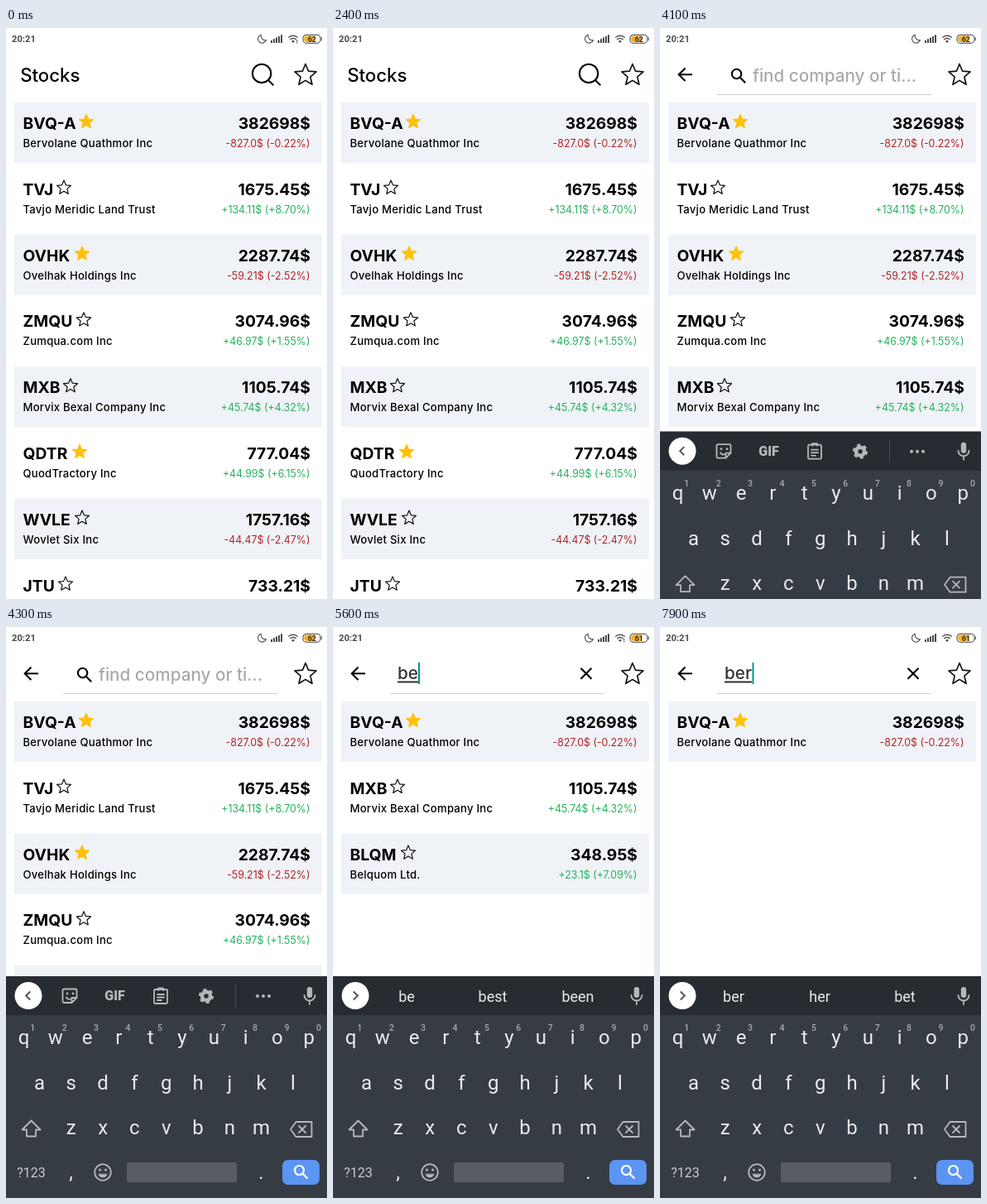
These frames come from a looping animation (388 px wide and 690 px high, 8000 ms). An HTML page:

```html
<!DOCTYPE html>
<html lang="en">
<head>
<meta charset="utf-8">
<title>Stocks search</title>
<style>
  html, body { margin: 0; width: 100%; height: 100%; overflow: hidden; background: #fff; }
  svg { display: block; width: 100%; height: 100%; }
  text { font-family: Inter, "Open Sans", sans-serif; }
  .line { fill: none; stroke: #000; stroke-width: 2.1; }
  .ticker { font-size: 19.3px; font-weight: 700; }
  .name { font-size: 13.1px; font-weight: 500; letter-spacing: .25px; }
  .change { font-size: 12.4px; }
  .end { text-anchor: end; }
  .title { font-size: 22.2px; font-weight: 500; }
  .field { font-size: 20.7px; font-weight: 500; }
  .typed { fill: #333; text-decoration: underline; text-decoration-thickness: 1.5px; text-underline-offset: 3px; }
  .up { fill: #24b25d; }
  .down { fill: #b22424; }
  .star { fill: none; stroke: #111; stroke-width: 1.2; stroke-linejoin: round; }
  .star.fav { fill: #ffc107; stroke: #ffc107; }
  .status text, .board text { font-family: Roboto, "Noto Sans", sans-serif; }
  .board text { fill: #e8eaed; text-anchor: middle; }
  .key { font-size: 24px; }
  .board .hint { font-size: 10.5px; font-weight: 500; fill: #a4a9af; }
  .word { font-size: 18px; }
  .icon { fill: none; stroke: #b4b8bd; stroke-width: 1.8; stroke-linejoin: round; stroke-linecap: round; }
  .solid { fill: #b4b8bd; stroke: none; }
</style>
</head>
<body>
<svg viewBox="0 0 388 690" preserveAspectRatio="none">
  <rect width="388" height="690" fill="#fff"/>
  <g id="lists"></g>

  <g class="status" fill="#4a4a4a">
    <text x="7" y="17" font-size="11.2" font-weight="700">20:21</text>
    <path d="M308.2 8.2a5.1 5.1 0 1 0 6.2 6.6a5.6 5.6 0 0 1-6.2-6.6z" fill="none" stroke="#4a4a4a" stroke-width="1.1"/>
    <path d="M320 15h2v3h-2zM323 13.3h2v4.7h-2zM326 11.6h2v6.4h-2zM329 10h2v8h-2zM332 8.3h2v9.7h-2z"/>
    <path d="M341.2 11.6a8.3 8.3 0 0 1 11.6 0M343.2 14a5.5 5.5 0 0 1 7.6 0" fill="none" stroke="#4a4a4a" stroke-width="1.3"/>
    <path d="M345 15.9a2.8 2.8 0 0 1 4 0l-2 2.1z"/>
    <path data-on="0-500 5300-6300" d="M350.2 16l1.5-2.2l1.5 2.2zM350.2 16.8h3l-1.5 2.2z" stroke="#fff" stroke-width=".4"/>
    <rect x="359" y="8.3" width="21" height="10" rx="4" fill="#fff" stroke="#666" stroke-width="1.2"/>
    <path d="M364 9.5h9.5v7.6h-9.5a3.8 3.8 0 0 1 0-7.6z" fill="#ffae1a"/>
    <path d="M381.2 11.3v4" stroke="#666" stroke-width="1.4"/>
    <text id="battery" x="369.8" y="16.5" font-size="9" font-weight="700" text-anchor="middle" fill="#333"></text>
  </g>

  <g data-on="0-3500">
    <text class="title" x="17.2" y="64.8">Stocks</text>
    <circle class="line" cx="309.1" cy="54.9" r="11.2"/>
    <path class="line" d="M317 63l6.3 6.3"/>
  </g>
  <g data-on="3500-8000">
    <path class="line" d="M39 56.2H23M30.5 48.4l-7.8 7.8l7.8 7.8"/>
    <path d="M69 80.5H328" stroke="#cfcfcf"/>
  </g>
  <g data-on="3500-4700">
    <circle class="line" cx="92.6" cy="55.5" r="5.7"/>
    <path class="line" d="M96.8 59.8l6.4 6.4"/>
    <text class="field" x="112" y="64.8" fill="#a9a9a9">find company or ti...</text>
  </g>
  <g data-on="4700-8000">
    <text class="field typed" id="typed" x="78" y="63.4"></text>
    <rect id="caret" y="43" width="2" height="26" fill="#009688"/>
    <path class="line" d="M299.5 49.7l13 13M312.5 49.7l-13 13"/>
  </g>
  <path id="bigStar" class="star" style="stroke-width:1.7"/>

  <g id="board" class="board">
    <rect y="422" width="388" height="268" fill="#363c44"/>
    <rect y="422" width="388" height="47" fill="#272c32"/>
    <circle cx="27" cy="445.5" r="16.5" fill="#fff"/>
    <path data-on="4000-4700" d="M29.2 440.5l-5 5l5 5" fill="none" stroke="#555" stroke-width="2"/>
    <path data-on="4700-8000" d="M24.8 440.5l5 5l-5 5" fill="none" stroke="#555" stroke-width="2"/>

    <g class="icon" data-on="4000-4700">
      <path d="M70 437.5h14q1.5 0 1.5 1.5v9l-6 6H70q-1.5 0-1.5-1.5V439q0-1.5 1.5-1.5zM85.5 448h-6v6M73 447.5a4 4 0 0 0 5 2"/>
      <circle class="solid" cx="74" cy="443" r="1.4"/>
      <circle class="solid" cx="81" cy="443" r="1.4"/>
      <text x="131.5" y="451" font-size="16" font-weight="900" style="fill:#b4b8bd;stroke:none">GIF</text>
      <rect x="179" y="438" width="16" height="17" rx="1.5"/>
      <path d="M184 439v-2.5h6v2.5M183 444h8M183 447.5h8M183 451h5"/>
      <circle cx="242" cy="446" r="5" stroke-width="4.5"/>
      <circle cx="242" cy="446" r="7.6" stroke-width="3" stroke-linecap="butt" stroke-dasharray="3.98"/>
      <path d="M277.5 432v28" stroke="#464c53" stroke-width="1"/>
      <circle class="solid" cx="304" cy="446" r="2"/>
      <circle class="solid" cx="311" cy="446" r="2"/>
      <circle class="solid" cx="318" cy="446" r="2"/>
    </g>
    <g id="words" data-on="4700-8000">
      <text class="word" x="89" y="453"></text>
      <text class="word" x="193" y="453"></text>
      <text class="word" x="296" y="453"></text>
    </g>
    <g class="icon">
      <rect class="solid" x="363.8" y="435" width="6.4" height="13" rx="3.2"/>
      <path d="M360.5 445a6.5 6.5 0 0 0 13 0M367 452v4"/>
      <path d="M30.5 596.5l11 11H36v8H25v-8h-5.5z"/>
      <path d="M350.5 598h19v18h-19l-6.500-9zM354 603l8 8M362 603l-8 8"/>
      <circle cx="117" cy="659" r="9.8"/>
      <path d="M112 661.5a5.3 5.3 0 0 0 10 0z" fill="#b4b8bd" stroke-width=".8"/>
      <circle class="solid" cx="113.5" cy="656" r="1.5"/>
      <circle class="solid" cx="120.5" cy="656" r="1.5"/>
    </g>
    <g id="keys"></g>
    <text x="30.5" y="665" font-size="16" style="fill:#c6cacf">?123</text>
    <text class="key" x="78.5" y="667">,</text>
    <text class="key" x="308.5" y="667">.</text>
    <rect x="146" y="647" width="133" height="24" rx="2.5" fill="#585d64"/>
    <rect x="334" y="644" width="45" height="30" rx="7" fill="#5b94f2"/>
    <circle cx="354.5" cy="656.5" r="5.5" fill="none" stroke="#fff" stroke-width="2.2"/>
    <path d="M358.5 660.5l6 6" stroke="#fff" stroke-width="2.4"/>
  </g>
</svg>

<script>
const LOOP = 8000;
const $ = id => document.getElementById(id);

// ticker, name, price, change, star x, favourite
const stocks = [
  ['BVQ-A', 'Bervolane Quathmor Inc', '382698$', '-827.0$ (-0.22%)', 97, 1],
  ['TVJ', 'Tavjo Meridic Land Trust', '1675.45$', '+134.11$ (+8.70%)', 70],
  ['OVHK', 'Ovelhak Holdings Inc', '2287.74$', '-59.21$ (-2.52%)', 92, 1],
  ['ZMQU', 'Zumqua.com Inc', '3074.96$', '+46.97$ (+1.55%)', 94],
  ['MXB', 'Morvix Bexal Company Inc', '1105.74$', '+45.74$ (+4.32%)', 78],
  ['QDTR', 'QuodTractory Inc', '777.04$', '+44.99$ (+6.15%)', 89, 1],
  ['WVLE', 'Wovlet Six Inc', '1757.16$', '-44.47$ (-2.47%)', 92],
  ['JTU', '', '733.21$', '', 72],
  ['BLQM', 'Belquom Ltd.', '348.95$', '+23.1$ (+7.09%)', 91]
];

function starPath(cx, cy, r) {
  const points = Array.from({ length: 10 }, (_, i) => {
    const a = i * Math.PI / 5, d = i % 2 ? r * 0.45 : r;
    return (cx + d * Math.sin(a)).toFixed(2) + ' ' + (cy - d * Math.cos(a)).toFixed(2);
  });
  return 'M' + points.join('L') + 'Z';
}

function row([ticker, name, price, change, x, fav], i) {
  const y = i * 79.8;
  const shade = i % 2 ? '' : `<rect x="10" y="${90 + y}" width="372" height="73" fill="#eff2f7"/>`;
  return `${shade}
    <text class="ticker" x="20.5" y="${122 + y}">${ticker}</text>
    <path class="star ${fav ? 'fav' : ''}" d="${starPath(x, 113.3 + y, 9)}"/>
    <text class="name" x="20.5" y="${144 + y}">${name}</text>
    <text class="ticker end" x="368" y="${122 + y}">${price}</text>
    <text class="change end ${change[0] === '-' ? 'down' : 'up'}" x="367.5" y="${144 + y}">${change}</text>`;
}

const list = (on, picks) =>
  `<g data-on="${on}">${picks.map(n => stocks[n]).map(row).join('')}</g>`;

$('lists').innerHTML =
  list('0-5500', [0, 1, 2, 3, 4, 5, 6, 7]) + list('5500-7000', [0, 4, 8]) + list('7000-8000', [0]);
$('bigStar').setAttribute('d', starPath(362, 57.2, 13.7));

const keyRow = (chars, x, y) => [...chars].map((c, i) =>
  `<text class="key" x="${x + i * 38.3}" y="${y}">${c}</text>`).join('');
$('keys').innerHTML =
  keyRow('qwertyuiop', 21.5, 504) + keyRow('asdfghjkl', 40.5, 559) + keyRow('zxcvbnm', 78.8, 613) +
  [...'1234567890'].map((c, i) => `<text class="hint" x="${32.3 + i * 38.4}" y="488">${c}</text>`).join('');

const typing = [
  { at: 4700, text: 'b', words: ['b', 'be', 'by'], caret: 91 },
  { at: 5200, text: 'be', words: ['be', 'best', 'been'], caret: 103 },
  { at: 6800, text: 'ber', words: ['ber', 'her', 'bet'], caret: 111.5 }
];

const timed = [...document.querySelectorAll('[data-on]')].map(el => ({
  el, spans: el.dataset.on.split(' ').map(s => s.split('-').map(Number))
}));
const wordSlots = [...$('words').children];
const setText = (el, s) => { if (el.textContent !== s) el.textContent = s; };

function draw(t) {
  for (const { el, spans } of timed)
    el.style.display = spans.some(([a, b]) => t >= a && t < b) ? '' : 'none';

  setText($('battery'), t < 4800 ? '62' : '61');

  const p = Math.min(1, Math.max(0, (t - 4000) / 200));
  $('board').setAttribute('transform', `translate(0 ${268 * (1 - p) ** 2})`);

  const step = typing.filter(s => t >= s.at).pop();
  if (!step) return;
  setText($('typed'), step.text);
  wordSlots.forEach((el, i) => setText(el, step.words[i]));
  $('caret').setAttribute('x', step.caret);
  $('caret').style.display = (t - step.at) % 1000 < 500 ? '' : 'none';
}

const start = performance.now();
function tick(now) {
  draw(Math.max(0, now - start) % LOOP);
  requestAnimationFrame(tick);
}
draw(0);
requestAnimationFrame(tick);
</script>
</body>
</html>
```
